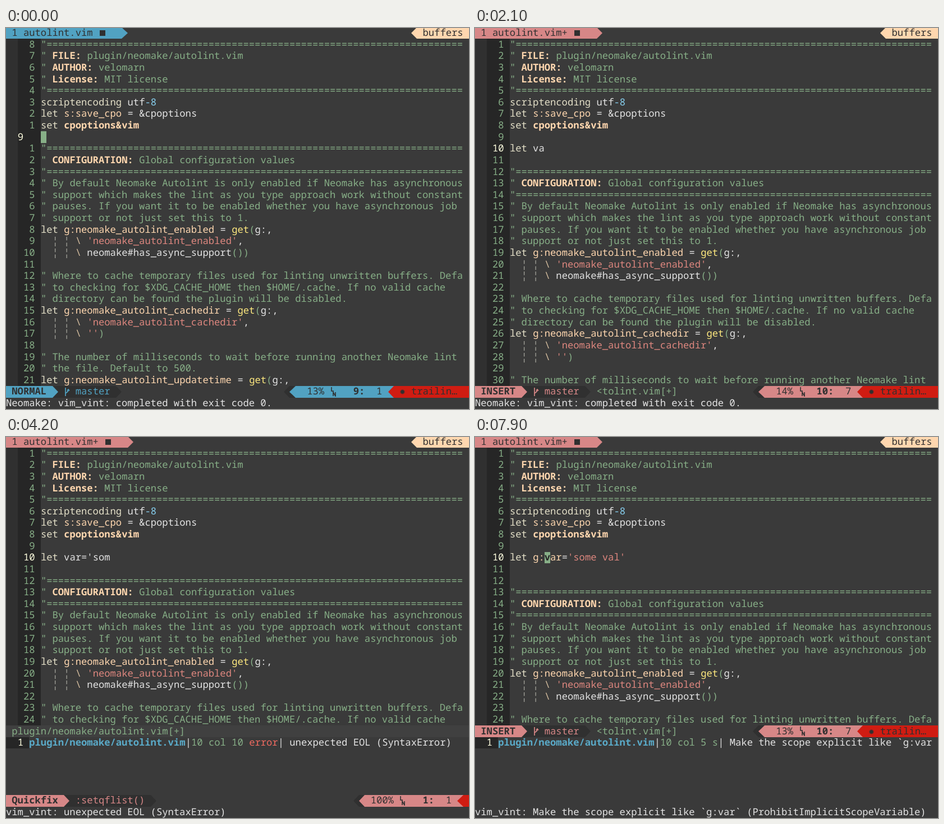
An HTML page that plays this animation: 825x679 px, repeating every 8 s.

```html
<!DOCTYPE html>
<html lang="en">
<head>
<meta charset="utf-8">
<title>Lint as you type</title>
<style>
html, body { margin: 0; width: 825px; height: 679px; overflow: hidden; background: #3a3a3a; }
#term { position: relative; width: 825px; height: 679px; overflow: hidden; }
#term i, #term span, #term svg { position: absolute; display: block; }
#term span {
  font: 17.1875px/20.625px "Noto Sans Mono", "DejaVu Sans Mono", monospace;
  white-space: pre; text-rendering: geometricPrecision; font-variant-ligatures: none;
}
</style>
</head>
<body>
<div id="term"></div>
<script>
const CW = 825 / 80, RH = 20.625, LOOP = 8000;
const DARK = '#303030', GUTTER = '#262626';
const BLUE = '#51a2c2', PINK = '#d78787', PEACH = '#ffd7af', RED = '#d01c12', GREEN = '#87af87';
const PLAIN = 400, SEMI = 600, BOLD = 700;

// Markup keys: {c:comment} {t:title} {k:keyword} ...
const INK = {
  c: GREEN, t: PEACH, k: '#e4e0c8', v: PEACH, s: '#de877f', f: '#ffe97f', n: '#87cfef',
  w: '#e4e4e4', p: GREEN, q: '#a8a8a0', b: '#d7bfa0', o: PEACH, e: '#f06a60', l: '#5aaac8'
};
const HEAVY = 'tol';

const RULE = '{c:"' + '='.repeat(72) + '}';
const note = s => `{c:" ${s}}`;
const head = (t, s) => `{c:"} {t:${t}:} {c:${s}}`;
const letGet = name => `{k:let} {v:g:${name}} = {f:get}{p:(}g:,`;
const cont = s => `  {q:¦ ¦} {b:\\} ${s}`;

const TOP = [
  RULE,
  head('FILE', 'plugin/neomake/autolint.vim'),
  head('AUTHOR', 'velomarn'),
  head('License', 'MIT license'),
  RULE,
  '{k:scriptencoding} utf{n:-8}',
  '{k:let} {v:s:save_cpo} = &cpoptions',
  '{k:set} {o:cpoptions&vim}',
  ''
];
const REST = [
  RULE,
  head('CONFIGURATION', 'Global configuration values'),
  RULE,
  note('By default Neomake Autolint is only enabled if Neomake has asynchronous'),
  note('support which makes the lint as you type approach work without constant'),
  note('pauses. If you want it to be enabled whether you have asynchronous job'),
  note('support or not just set this to 1.'),
  letGet('neomake_autolint_enabled'),
  cont("{s:'neomake_autolint_enabled'},"),
  cont('neomake#has_async_support{p:())}'),
  '',
  note('Where to cache temporary files used for linting unwritten buffers. Defa'),
  note('to checking for $XDG_CACHE_HOME then $HOME/.cache. If no valid cache'),
  note('directory can be found the plugin will be disabled.'),
  letGet('neomake_autolint_cachedir'),
  cont("{s:'neomake_autolint_cachedir'},"),
  cont("{s:''}{p:)}"),
  '',
  note('The number of milliseconds to wait before running another Neomake lint'),
  note('the file. Default to 500.'),
  letGet('neomake_autolint_updatetime')
];

const EOL = 'unexpected EOL (SyntaxError)';
const SCOPE = 'Make the scope explicit like `g:var';
const eolAt = col => `10 col ${col} {e:error}`;

// Each step changes part of the editor state.
const STEPS = [
  [0, { insert: false, text: '', added: 0, line: 9, col: 1, cursor: true, qf: '', why: EOL,
        inQf: false, menu: false, msg: 'Neomake: vim_vint: completed with exit code 0.' }],
  [100, { insert: true, added: 1, line: 10 }],
  [200, { added: 2, line: 11 }],
  [300, { cursor: false }],
  [400, { line: 10, cursor: true }],
  [600, { text: 'l', cursor: false }],
  [800, { text: 'le' }],
  [900, { cursor: true }],
  [1000, { text: 'let', cursor: false }],
  [1200, { cursor: true }],
  [1600, { cursor: false }],
  [1900, { text: 'let ' }],
  [2000, { text: 'let v' }],
  [2100, { text: 'let va' }],
  [2300, { text: 'let var' }],
  [2400, { cursor: true }],
  [2600, { cursor: false }],
  [2800, { text: 'let var=' }],
  [3000, { qf: eolAt(9), inQf: true, msg: 'vim_vint: ' + EOL }],
  [3200, { cursor: true }],
  [3300, { cursor: false }],
  [3500, { text: "let var='" }],
  [3700, { qf: eolAt(10) }],
  [3800, { text: "let var='s" }],
  [4000, { text: "let var='so" }],
  [4200, { text: "let var='som" }],
  [4400, { text: "let var='some" }],
  [4600, { cursor: true }],
  [5000, { cursor: false }],
  [5200, { text: "let var='some " }],
  [5300, { text: "let var='some v" }],
  [5500, { text: "let var='some va", menu: true }],
  [5700, { qf: eolAt(16) }],
  [5800, { text: "let var='some val" }],
  [6000, { cursor: true }],
  [6100, { text: "let var='some val'", menu: false, cursor: false }],
  [6500, { qf: '10 col 5 s', why: SCOPE, msg: 'vim_vint: ' + SCOPE + '` (ProhibitImplicitScopeVariable)' }],
  [6700, { cursor: true }],
  [6900, { cursor: false }],
  [7000, { inQf: false, added: 3, line: 11, col: 1 }],
  [7200, { line: 10, col: 1 }],
  [7400, { col: 5, cursor: true }],
  [7600, { text: "let g:var='some val'", col: 7, cursor: false }],
  [7900, { cursor: true }]
];

// Typing leaves the cursor after the text unless a step says otherwise.
const states = [];
STEPS.forEach(([, patch], i) => {
  const s = { ...states[i - 1], ...patch };
  if ('text' in patch && !('col' in patch)) s.col = patch.text.length + 1;
  states.push(s);
});

let html = '';
const x = c => Math.round(c * CW);
const y = r => Math.floor(r * RH - 1);
const esc = s => s.replace(/&/g, '&amp;').replace(/</g, '&lt;');

function box(r, c, w, color, rows = 1, clip = '') {
  html += `<i style="left:${x(c)}px;top:${y(r)}px;width:${x(c + w) - x(c)}px;` +
    `height:${y(r + rows) - y(r)}px;background:${color};${clip}"></i>`;
}
function arrow(r, c, color, left) {
  const shape = left ? '100% 0,0 50%,100% 100%' : '0 0,100% 50%,0 100%';
  box(r, c, 1, color, 1, `clip-path:polygon(${shape})`);
}
function put(r, c, s, color, weight = PLAIN) {
  html += `<span style="left:${c * CW}px;top:${r * RH - 1}px;color:${color};font-weight:${weight}">${esc(s)}</span>`;
}
function rich(r, c, s, base = INK.w) {
  for (const [all, key, inner] of s.matchAll(/\{(\w):(.*?)\}|[^{]+/g)) {
    const t = key ? inner : all;
    if (t.trim()) put(r, c, t, key ? INK[key] : base, key && HEAVY.includes(key) ? BOLD : PLAIN);
    c += t.length;
  }
}

function branch(r, c, color) {
  html += `<svg style="left:${c * CW}px;top:${y(r) + 2}px" width="11" height="17" fill="none" ` +
    `stroke="${color}" stroke-width="1.7"><path d="M3 1V16M3 12C3 9 8 10 8 5M6 6.5L8 4L10 6.5"/></svg>`;
}
function lineMark(r, c) {
  html += `<svg style="left:${c * CW}px;top:${y(r) + 1}px" width="11" height="18" fill="none" ` +
    `stroke="${DARK}" stroke-width="1.6"><path d="M2 1V8H6M5 17V10L9 17V10"/></svg>`;
}

function tabs(s) {
  const tint = s.insert ? PINK : BLUE, name = s.insert ? 'autolint.vim+' : 'autolint.vim';
  const end = name.length + 8;
  box(0, 0, end, tint);
  arrow(0, end, tint);
  put(0, 1, '1 ' + name, DARK);
  html += `<i style="left:${(name.length + 4) * CW + 2}px;top:4px;width:10px;height:10px;background:${DARK}"></i>`;
  arrow(0, 70, PEACH, true);
  box(0, 71, 9, PEACH);
  put(0, 72, 'buffers', DARK);
}

function barLeft(r, mode, end, tint) {
  const w = mode.length + 2;
  box(r, 0, end, DARK);
  arrow(r, end, DARK);
  box(r, 0, w, tint);
  arrow(r, w, tint);
  put(r, 1, mode, DARK, SEMI);
}
function barRight(r, c, tint, pct, line, col) {
  arrow(r, c, DARK, true);
  box(r, c + 1, 1, DARK);
  arrow(r, c + 1, tint, true);
  box(r, c + 2, 17, tint);
  put(r, c + 3, (pct + '%').padStart(4), DARK);
  lineMark(r, c + 8);
  put(r, c + 10, (line + ':').padStart(4), DARK, SEMI);
  put(r, c + 14, String(col).padStart(3), DARK);
  arrow(r, c + 18, RED, true);
  box(r, c + 19, 80 - c - 19, RED);
}
function fileBar(r, s) {
  const tint = s.insert ? PINK : BLUE;
  barLeft(r, s.insert ? 'INSERT' : 'NORMAL', 19, tint);
  branch(r, 10, tint);
  put(r, 12, 'master', tint);
  if (s.insert) put(r, 21, '<tolint.vim[+]', GREEN);
  barRight(r, 48, tint, Math.floor(100 * s.line / (69 + s.added)), s.line, s.col);
  put(r, 68, '✹', DARK);
  put(r, 70, 'trailin…', DARK);
}

function typed(text) {
  const m = text.match(/^let (g:)?(\w*)=('.*')$/);
  if (!m) return text.replace(/^let/, '{k:let}');
  const name = m[1] ? `{v:g:${m[2]}}` : m[2];
  return `{k:let} ${name}={s:${m[3]}}`;
}

function buffer(s, rows) {
  const mine = s.added ? [typed(s.text), ...Array(s.added - 1).fill('')] : [];
  const lines = [...TOP, ...mine, ...REST].slice(0, rows);
  box(1, 0, 2, DARK, rows);
  box(1, 2, 4, GUTTER, rows);
  lines.forEach((l, i) => {
    const n = i + 1, here = n === s.line;
    const label = s.insert || here ? n : Math.abs(n - s.line);
    if (here && !s.insert) put(n, 2, String(n), '#ffffe0');
    else put(n, 2, String(label).padStart(3), here ? '#ffffe0' : GREEN);
    rich(n, 6, l);
  });
  if (s.cursor) {
    box(s.line, s.col + 5, 1, GREEN);
    const under = s.line === 10 ? s.text[s.col - 1] : '';
    if (under) put(s.line, s.col + 5, under, GUTTER, BOLD);
  }
}

function quickfix(s) {
  box(26, 0, 4, GUTTER);
  put(26, 2, '1', '#ffffe0');
  rich(26, 4, '{l:plugin/neomake/autolint.vim}');
  put(26, 31, '|', INK.w);
  rich(26, 32, s.qf, GREEN);
  const end = 32 + s.qf.replace(/\{\w:|\}/g, '').length;
  put(26, end, '| ' + s.why, INK.w);
  if (!s.inQf) return fileBar(25, s);
  box(25, 0, 80, '#404040');
  put(25, 1, 'plugin/neomake/autolint.vim[+]', GREEN);
  barLeft(31, 'Quickfix', 25, PINK);
  put(31, 12, ':setqflist()', PINK);
  barRight(31, 60, PINK, 100, 1, 1);
}

function draw(s) {
  html = '';
  tabs(s);
  buffer(s, s.qf ? 24 : 30);
  if (s.qf) quickfix(s); else fileBar(31, s);
  if (s.menu) {
    box(11, 19, 16, GUTTER, 2);
    put(11, 20, 'valid  [ID]', GREEN);
    put(12, 20, 'values [ID]', GREEN);
  }
  put(32, 0, s.msg, INK.w);
  document.getElementById('term').innerHTML = html;
}

let shown = -1;
const start = performance.now();
function tick() {
  const t = (performance.now() - start) % LOOP;
  let i = STEPS.length - 1;
  while (STEPS[i][0] > t) i--;
  if (i !== shown) draw(states[shown = i]);
  requestAnimationFrame(tick);
}
tick();
</script>
</body>
</html>
```
